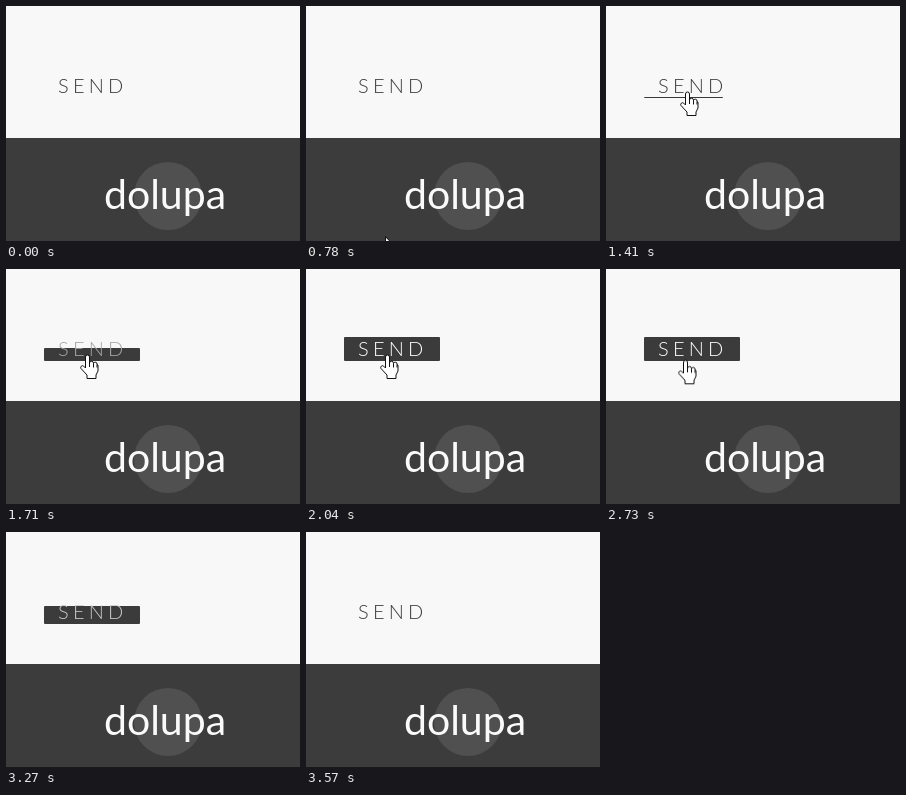
An HTML page for the animation above (4560 ms loop, 294 px wide and 235 px high).

```html
<!DOCTYPE html>
<html lang="en">
<head>
<meta charset="utf-8">
<title>Send button hover</title>
<style>
html, body { margin: 0; width: 100%; height: 100%; overflow: hidden; background: #f8f8f8; }
svg { display: block; width: 294px; height: 235px; }

.fill, .label, .cursor, .arrow, .hand { animation: 4560ms linear infinite; }

/* An underline grows, then rises into a solid button */
.fill { fill: #3b3b3b; animation-name: grow; }
.label {
  font: 300 20px Lato, "Open Sans", sans-serif;
  letter-spacing: 4.2px;
  fill: #3c3c3c;
  animation-name: tint;
}
.cursor { animation-name: move; }
.arrow { animation-name: arrow; }
.hand { animation-name: hand; }
.cursor path { fill: #fff; stroke: #111; stroke-linejoin: round; }
.brand { font: 400 41px Lato, sans-serif; fill: #fafafa; text-anchor: middle; }

@keyframes grow {
  0% { width: 0; height: 1px; y: 91px; }
  25.219% { width: 0; animation-timing-function: ease; }
  34.21% { height: 1px; y: 91px; animation-timing-function: ease; }
  36.184% { width: 96px; }
  45.175%, 60.2% { height: 24px; y: 68px; }
  66.447% { height: 25px; y: 67px; }
  70.175% { height: 25px; y: 67px; animation-timing-function: ease; }
  78.2% { width: 96px; height: 0; y: 92px; }
  78.21%, 100% { width: 0; height: 0; y: 92px; }
}
@keyframes tint {
  0% { fill: #3c3c3c; }
  34.21% { fill: #3c3c3c; animation-timing-function: ease; }
  44.7%, 66.447% { fill: #fff; }
  70.175% { fill: #fff; animation-timing-function: ease; }
  78.2%, 100% { fill: #3c3c3c; }
}
@keyframes move {
  0%, 16.447% { transform: translate(79px, 245px); }
  17.105% { transform: translate(79px, 231px); animation-timing-function: cubic-bezier(.3, .4, .6, .9); }
  21.711% { transform: translate(75px, 110px); animation-timing-function: cubic-bezier(.2, .5, .6, 1); }
  25.219% { transform: translate(78px, 92px); animation-timing-function: ease-out; }
  28.289%, 59.211% { transform: translate(80px, 86px); }
  59.868% { transform: translate(78px, 91px); animation-timing-function: cubic-bezier(.4, .25, .7, .7); }
  66.447% { transform: translate(75px, 228px); }
  67.105%, 100% { transform: translate(75px, 245px); }
}
@keyframes arrow {
  0%, 25.21% { opacity: 1; }
  25.22%, 60.19% { opacity: 0; }
  60.2%, 100% { opacity: 1; }
}
@keyframes hand {
  0%, 25.21% { opacity: 0; }
  25.22%, 60.19% { opacity: 1; }
  60.2%, 100% { opacity: 0; }
}
</style>
</head>
<body>
<svg viewBox="0 0 294 235">
  <rect width="294" height="235" fill="#f8f8f8"/>
  <rect class="fill" x="38" y="91" width="0" height="1" rx="1"/>
  <text class="label" x="52" y="87">SEND</text>

  <rect y="132" width="294" height="103" fill="#3c3c3c"/>
  <circle cx="162" cy="190" r="34" fill="#505050"/>
  <text class="brand" x="159" y="203">dolupa</text>

  <g class="cursor">
    <path class="arrow" d="M.5 .5V16.5L4.2 13.2 6.6 18.8 9.3 17.8 7.2 12.5H12Z"/>
    <g class="hand">
      <path d="M-.5 13V2a2 2 0 0 1 4 0V8a2 2 0 0 1 4 .5a1.8 1.8 0 0 1 3.5 1a1.3 1.3 0 0 1 1 1.5V16l-2 4v3.5H1V20L-5 13.5a1.8 1.8 0 0 1 2.6-2.4Z"/>
      <path d="M3.5 8v4M7.5 8.5v4M11 9.5v3"/>
    </g>
  </g>
</svg>
</body>
</html>
```
